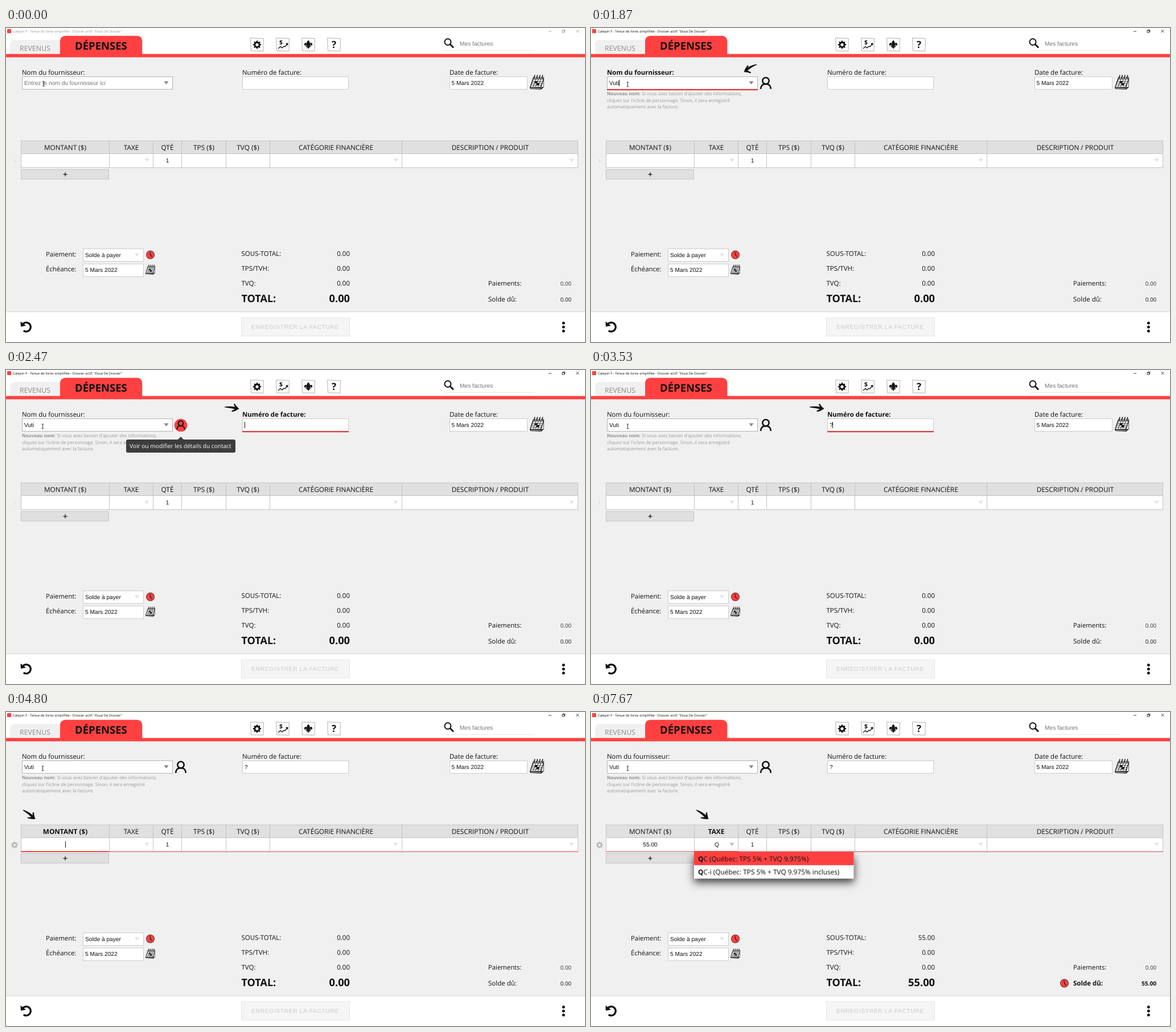
Animation of 1017x551 px, one loop 8 s. Source, as an HTML page with a canvas:

```html
<!DOCTYPE html>
<html lang="fr">
<head>
<meta charset="utf-8">
<title>Dépenses</title>
<style>
html, body { margin: 0; width: 100%; height: 100%; overflow: hidden; background: #fff; }
canvas { display: block; }
</style>
</head>
<body>
<canvas id="stage" width="1017" height="551"></canvas>
<script>
const ctx = document.getElementById('stage').getContext('2d');
const LOOP = 8000;
const RED = '#ff4040';
const UI = '"Open Sans", "Noto Sans", sans-serif';
const ARIAL = '"Liberation Sans", Arial, sans-serif';
const LIFT = 0.5; // raises every baseline
const SUPPLIER = 'Vuti';
const COLS = [26, 181, 258, 308, 386, 463, 695, 1005];
const HEADS = ['MONTANT ($)', 'TAXE', 'QTÉ', 'TPS ($)', 'TVQ ($)',
  'CATÉGORIE FINANCIÈRE', 'DESCRIPTION / PRODUIT'];

const within = (t, a, b) => t >= a && t < b;
const ramp = (t, a, b) => Math.min(1, Math.max(0, (t - a) / (b - a)));

function text(s, x, y, size, { color = '#111', bold = false, font = UI, align = 'left', gap = 0 } = {}) {
  ctx.font = `${bold ? 'bold ' : ''}${size}px ${font}`;
  ctx.textAlign = align;
  ctx.letterSpacing = gap + 'px';
  ctx.fillStyle = color;
  ctx.fillText(s, x, y - LIFT);
  return ctx.measureText(s).width;
}

const input = (s, x, y, opt = {}) => text(s, x, y, 10.2, { font: ARIAL, ...opt });

function rect(x1, y1, x2, y2, color) {
  ctx.fillStyle = color;
  ctx.fillRect(x1, y1, x2 - x1, y2 - y1);
}

function frame(x1, y1, x2, y2, fill, line) {
  rect(x1, y1, x2, y2, line);
  rect(x1 + 1, y1 + 1, x2 - 1, y2 - 1, fill);
}

function disc(x, y, r, color) {
  ctx.fillStyle = color;
  ctx.beginPath();
  ctx.arc(x, y, r, 0, Math.PI * 2);
  ctx.fill();
}

// Path from a flat list of points
function poly(p) {
  ctx.beginPath();
  for (let i = 0; i < p.length; i += 2) ctx.lineTo(p[i], p[i + 1]);
}

function line(p, color, width) {
  poly(p);
  ctx.strokeStyle = color;
  ctx.lineWidth = width;
  ctx.stroke();
}

function fillPoly(p, color) {
  poly(p);
  ctx.fillStyle = color;
  ctx.fill();
}

const drop = (x, y, color, w = 4) => fillPoly([x - w, y - 2.5, x + w, y - 2.5, x, y + 3], color);
const caret = (x, y) => rect(x, y, x + 1, y + 11, '#111');

function at(x, y, scale, draw) {
  ctx.save();
  ctx.translate(x, y);
  ctx.scale(scale, scale);
  draw();
  ctx.restore();
}

function withShadow(draw) {
  ctx.save();
  ctx.shadowColor = 'rgba(0,0,0,.75)';
  ctx.shadowBlur = 14;
  ctx.shadowOffsetY = 7;
  draw();
  ctx.restore();
}

function gear(x, y, r, color) {
  ctx.beginPath();
  for (let i = 0; i < 32; i++) {
    const a = (i - 1.5) / 32 * Math.PI * 2;
    const d = i % 4 === 1 || i % 4 === 2 ? r : r * 0.74;
    ctx.lineTo(x + Math.cos(a) * d, y + Math.sin(a) * d);
  }
  ctx.closePath();
  ctx.moveTo(x + r * 0.36, y);
  ctx.arc(x, y, r * 0.36, 0, Math.PI * 2);
  ctx.fillStyle = color;
  ctx.fill('evenodd');
}

function clock(x, y) {
  disc(x, y, 7.5, '#3a1a1a');
  disc(x, y, 6.8, RED);
  line([x - 0.5, y - 5, x, y, x + 3, y + 3.5], '#222', 1.3);
}

// Tilted desk calendar: page stack, grid, rings
function calendar(x, y, scale) {
  at(x, y, scale, () => {
    fillPoly([6, 4, 25, 4, 24.5, 22, 20, 26, 1, 25, 0, 22], '#222');
    fillPoly([6.5, 8, 23.5, 8, 18.5, 21.5, 1.5, 21.5], '#fff');
    fillPoly([20, 22.5, 24, 10, 24, 21], '#e4e4e4');
    line([2, 23.6, 19.5, 24.2], '#fff', 0.8);
    fillPoly([6.5, 5, 24, 5, 23.5, 7, 6, 7], '#bbb');
    for (let i = 1; i < 4; i++) line([6.5 + i * 4.25, 8, 1.5 + i * 4.25, 21.5], '#333', 0.9);
    for (let j = 1; j < 4; j++) line([6.5 - j * 1.25, 8 + j * 3.4, 23.5 - j * 1.25, 8 + j * 3.4], '#333', 0.9);
    fillPoly([9.5, 11.4, 13.8, 11.4, 12.5, 14.8, 8.2, 14.8], '#111');
    fillPoly([12.5, 14.8, 16.8, 14.8, 15.5, 18.2, 11.2, 18.2], '#111');
    for (let i = 0; i < 4; i++) {
      line([8 + i * 4.6, 6.5, 8.8 + i * 4.6, 0.5], '#111', 1.6);
      line([9.2 + i * 4.6, 5.5, 9.8 + i * 4.6, 2], '#fff', 0.7);
    }
  });
}

function person(x, y, scale) {
  at(x, y, scale, () => {
    ctx.strokeStyle = '#111';
    ctx.lineWidth = 2.6;
    ctx.beginPath();
    ctx.arc(0, -3.8, 5.7, 0, Math.PI * 2);
    ctx.stroke();
    ctx.beginPath();
    ctx.moveTo(-8.8, 10.5);
    ctx.bezierCurveTo(-8.8, 5, -6, 1.8, 0, 1.8);
    ctx.bezierCurveTo(6, 1.8, 8.8, 5, 8.8, 10.5);
    ctx.stroke();
  });
}

// Curved pen-drawn arrow with a swept head
function arrow(x1, y1, x2, y2, bend) {
  const len = Math.hypot(x2 - x1, y2 - y1);
  ctx.save();
  ctx.translate(x2, y2);
  ctx.rotate(Math.atan2(y2 - y1, x2 - x1));
  ctx.fillStyle = '#111';
  ctx.beginPath();
  ctx.moveTo(-len, -0.6);
  ctx.quadraticCurveTo(-len * 0.5, bend - 1.6, -3, -1.8);
  ctx.lineTo(-3, 1.8);
  ctx.quadraticCurveTo(-len * 0.5, bend + 3.2, -len, 0.6);
  ctx.fill();
  ctx.beginPath();
  ctx.moveTo(0.5, 0);
  ctx.quadraticCurveTo(-4, -2.5, -8.5, -8);
  ctx.lineTo(-10, -6.5);
  ctx.quadraticCurveTo(-6.5, -2, -6.5, 0);
  ctx.quadraticCurveTo(-8, 3, -12, 5);
  ctx.lineTo(-11.5, 7);
  ctx.quadraticCurveTo(-5, 5, 0.5, 0);
  ctx.fill();
  ctx.restore();
}

function fleur(x, y) {
  at(x, y, 1, () => {
    ctx.fillStyle = '#111';
    ctx.beginPath();
    ctx.moveTo(0, -8);
    ctx.quadraticCurveTo(5, -3, 1.2, 2);
    ctx.lineTo(-1.2, 2);
    ctx.quadraticCurveTo(-5, -3, 0, -8);
    ctx.fill();
    for (const s of [-1, 1]) {
      ctx.beginPath();
      ctx.moveTo(s * 1.4, 2);
      ctx.bezierCurveTo(s * 2, -3, s * 5, -5, s * 7, -1.5);
      ctx.bezierCurveTo(s * 7.6, 1, s * 5.5, 2.6, s * 4.6, 1.4);
      ctx.bezierCurveTo(s * 5.5, -1, s * 3.2, -0.5, s * 3, 2);
      ctx.fill();
    }
    ctx.fillRect(-4.5, 1.8, 9, 1.6);
    fillPoly([-1.3, 3, 1.3, 3, 3.8, 5.5, 1.2, 5, 0, 8, -1.2, 5, -3.8, 5.5], '#111');
  });
}

function header(t) {
  const ink = t < 70 ? '#999' : '#111';
  rect(0, 0, 1017, 46, '#fff');
  rect(2, 2, 9, 9, RED);
  text('Calepin F - Tenue de livres simplifiée - Dossier actif: "Essai De Dossier"', 12, 8.6, 5.95, { color: ink });
  line([953, 6, 958, 6], ink, 0.8);
  ctx.strokeStyle = ink;
  ctx.lineWidth = 0.8;
  ctx.strokeRect(977, 4.5, 3.5, 3.5);
  line([978.2, 4.5, 978.2, 3.3, 981.8, 3.3, 981.8, 6.8, 980.5, 6.8], ink, 0.8);
  line([1001.5, 3, 1006.5, 8], ink, 0.8);
  line([1006.5, 3, 1001.5, 8], ink, 0.8);

  ctx.fillStyle = '#f0f0f0';
  ctx.beginPath();
  ctx.roundRect(7, 21, 92, 26, [8, 0, 0, 0]);
  ctx.fill();
  text('REVENUS', 24, 40.3, 12.4, { color: '#8c8c8c' });
  ctx.fillStyle = RED;
  ctx.beginPath();
  ctx.roundRect(95, 13.7, 144.3, 34, [9, 9, 0, 0]);
  ctx.fill();
  rect(0, 45.6, 1017, 51.4, RED);
  text('DÉPENSES', 121, 38.3, 18.5, { bold: true });

  for (const x of [441, 486, 531, 576]) {
    poly([x - 11.5, 17.5, x + 11.5, 18.5, x + 11, 40.5, x - 10.5, 40, x - 11.5, 17.5]);
    ctx.fillStyle = '#fdfdfd';
    ctx.fill();
    ctx.strokeStyle = '#aaa';
    ctx.lineWidth = 0.9;
    ctx.stroke();
  }
  gear(441, 29.3, 7.3, '#111');
  text('$', 483, 29, 10.5, { bold: true, align: 'center' });
  line([478, 36, 482, 32.5, 485, 35, 488, 32, 490, 33, 494, 28], '#111', 1.3);
  fillPoly([491, 27, 495.5, 26.3, 495, 31], '#111');
  fleur(531, 29.3);
  text('?', 576, 35.5, 17, { bold: true, align: 'center' });

  ctx.strokeStyle = '#111';
  ctx.lineWidth = 2;
  ctx.beginPath();
  ctx.arc(776, 24.5, 5.5, 0, Math.PI * 2);
  ctx.stroke();
  line([780, 28.5, 786, 34.5], '#111', 2.8);
  input('Mes factures', 797, 31.2, { color: '#757575' });
  rect(769, 39, 928, 40, '#e8e8e8');
}

function field(label, x1, x2, focused, border) {
  text(label, x1, 82.3, 11.45, { bold: focused });
  frame(x1, 85, x2, 108, '#fff', border);
  if (focused) rect(x1, 107, x2, 109.3, '#e03a3a');
}

function supplier(t) {
  const focused = within(t, 270, 2070);
  field('Nom du fournisseur:', 28, 293, focused, '#b4b4b4');
  drop(281.5, 96, '#888');
  const count = [1130, 1470, 1730, 1870].filter(k => t >= k).length;
  const typed = SUPPLIER.slice(0, count);
  const width = count ? input(typed, 32, 100) : 0;
  if (!count) input('Entrez le nom du fournisseur ici', 32, 100, { color: '#757575' });
  if (focused && !within(t, 800, 1130)) caret(32 + Math.round(width), 91);
  if (focused) arrow(291, 64, 269, 77, 2.5);

  if (within(t, 270, 1130)) {
    ctx.globalAlpha = ramp(t, 200, 330);
    withShadow(() => rect(28, 109, 293, 133, '#fff'));
    ctx.globalAlpha = 1;
  }
  if (t >= 1470) {
    const grey = { color: '#999' };
    text('Nouveau nom:', 28, 118.8, 8.05, { color: '#909090', bold: true });
    text("Si vous avez besoin d'ajouter des informations,", 89.5, 118.8, 8.05, grey);
    text("cliquez sur l'icône de personnage. Sinon, il sera enregistré", 28, 130, 8.05, grey);
    text('automatiquement avec la facture.', 28, 141, 8.05, grey);
    const hot = within(t, 2070, 2670) ? 1 - ramp(t, 2470, 2670) : 0;
    if (hot) {
      ctx.globalAlpha = hot;
      disc(307, 97, 11.3, RED);
      ctx.globalAlpha = 1;
    }
    person(307, 96.5, 1 - 0.24 * hot);
  }
}

function tooltip(t) {
  const a = ramp(t, 2070, 2270) * (1 - ramp(t, 2470, 2670));
  if (!a) return;
  ctx.globalAlpha = a;
  fillPoly([301.5, 122.5, 307, 117, 312.5, 122.5], '#3d3d3d');
  ctx.fillStyle = '#3d3d3d';
  ctx.beginPath();
  ctx.roundRect(211, 122, 192, 23, 3);
  ctx.fill();
  text('Voir ou modifier les détails du contact', 217, 137.5, 10.17, { color: '#fff' });
  ctx.globalAlpha = 1;
}

function invoice(t) {
  const focused = within(t, 2470, 4000);
  field('Numéro de facture:', 415, 602, focused, '#ccc');
  if (t >= 3530) input('?', 419, 100);
  if (focused) {
    if (t >= 3530) caret(424, 91);
    else if (t < 3000) caret(419, 91);
    arrow(384, 65, 409, 68, -2.5);
  }
}

function dateField(t) {
  const focused = within(t, 4000, 4800);
  field('Date de facture:', 779, 916, focused, '#ccc');
  input('5 Mars 2022', 782.5, 100);
  calendar(920, 82, 1);
  if (focused) arrow(748, 65, 773, 68, -2.5);
}

function datePicker(t) {
  if (!within(t, 4000, 4800)) return;
  withShadow(() => rect(779, 109, 976, 356, '#fff'));
  text('Mars 2022', 877.5, 134, 11.5, { bold: true, align: 'center' });
  const x = i => 796.5 + (i % 7) * 27;
  [...'DLMMJVS'].forEach((d, i) => input(d, x(i), 164, { align: 'center', color: '#888' }));
  for (let day = 1; day <= 31; day++) {
    const slot = day + 1, y = 197 + Math.floor(slot / 7) * 34;
    if (day === 5) disc(x(slot), y - 4, 11, RED);
    input(day, x(slot), y, { align: 'center' });
  }
}

function table(t) {
  const active = t < 4800 ? -1 : t < 6800 ? 0 : 1;
  rect(26, 197.6, 1005, 245, '#c4c4c4');
  HEADS.forEach((head, i) => {
    const a = COLS[i], b = COLS[i + 1], mid = (a + b) / 2 + 0.5;
    rect(a + 1, 198.6, b, 221, '#e0e0e0');
    rect(a + 1, 221, b, 244.6, '#fff');
    text(head, mid, 214.5, 11.8, { bold: i === active, align: 'center' });
  });
  rect(26, 220, 1005, 221, '#c4c4c4');
  rect(1004, 198, 1005, 245, '#c4c4c4');
  rect(26, 244.6, 1005, 245.6, active < 0 ? '#ccc' : '#e04848');
  if (active >= 0) rect(COLS[active], 244, COLS[active + 1], 245.8, RED);
  drop(247.5, 232, t >= 6800 ? '#bbb' : '#e2e2e2');
  drop(684.5, 232, '#e2e2e2');
  drop(993.5, 232, '#e2e2e2');
  input('1', 283.5, 236, { align: 'center' });
  if (active < 0) text('1', 15, 236.5, 7.5, { color: '#bbb', align: 'center' });
  else gear(15, 233.3, 6, '#b8b8b8');

  frame(26, 248, 181, 265.6, '#e0e0e0', '#c4c4c4');
  line([100.5, 256.8, 107.5, 256.8], '#111', 1.2);
  line([104, 253.3, 104, 260.3], '#111', 1.2);

  const amount = t >= 6800 ? '55.00' : t >= 6530 ? '55' : t >= 6270 ? '5' : '';
  if (amount) input(amount, 104, 236, { align: 'center' });
  if (active === 0) {
    if (t >= 6270) caret(t >= 6530 ? 109 : 106, 227);
    else if (!within(t, 5330, 5870)) caret(104, 227);
    arrow(30, 172, 51, 187.5, -3);
  }
  if (active === 1) {
    arrow(185, 172, 206, 187.5, -3);
    if (t < 7130) caret(221, 227);
    else {
      input('Q', 221, 236, { align: 'center' });
      if (t < 7670) caret(224, 227);
    }
  }
}

function taxList(t) {
  if (t < 7130) return;
  withShadow(() => rect(181, 247, 461.5, 292.4, '#fff'));
  rect(181, 245.4, 461.5, 268.8, RED);
  const size = 11.85;
  [['C (Québec: TPS 5% + TVQ 9.975%)', 262], ['C-i (Québec: TPS 5% + TVQ 9.975% incluses)', 285]].forEach(([s, y]) => {
    const w = text('Q', 188, y, size, { bold: true });
    text(s, 188 + w, y, size);
  });
}

function totals(t) {
  const sum = t >= 6800 ? '55.00' : '0.00';
  const due = t >= 6800;
  text('Paiement:', 70, 401, 11.4);
  text('Échéance:', 70, 427.8, 11.4);
  frame(135, 387, 242, 410, '#fff', '#ccc');
  frame(135, 413.6, 242, 436.6, '#fff', '#ccc');
  input('Solde à payer', 139, 402);
  input('5 Mars 2022', 139, 428.3);
  drop(230, 398, '#e2e2e2');
  clock(253.5, 398);
  calendar(245, 415, 0.68);

  [['SOUS-TOTAL:', sum], ['TPS/TVH:', '0.00'], ['TVQ:', '0.00']].forEach(([label, value], i) => {
    text(label, 413.5, 400.3 + i * 25.9, 11.5);
    text(value, 604, 400.3 + i * 25.9, 11.5, { align: 'right' });
  });
  text('TOTAL:', 413.5, 481.5, 18, { bold: true });
  text(sum, 604, 481.5, 18.3, { bold: true, align: 'right' });
  text('Paiements:', 847, 452.3, 11.3);
  text('0.00', 993, 452.6, 9.7, { align: 'right', color: '#333' });
  text('Solde dû:', 847, 480, 11.5, { bold: due });
  text(sum, 993, 480, due ? 10.1 : 9.7, { align: 'right', bold: due });
  if (due) clock(831.5, 476);
}

function footer() {
  rect(0, 497.5, 1017, 551, '#d4d4d4');
  rect(0, 498.5, 1017, 551, '#fff');
  ctx.strokeStyle = '#111';
  ctx.lineWidth = 3.3;
  ctx.beginPath();
  ctx.arc(35.5, 524.7, 7.9, -2.45, 2.2);
  ctx.stroke();
  fillPoly([25.5, 515, 26, 524, 35, 522.5], '#111');
  frame(413, 508, 604, 541, '#f5f5f5', '#e6e6e6');
  input('ENREGISTRER LA FACTURE', 431, 528.2, { color: '#cbcbcb', gap: 0.7 });
  for (const y of [518, 525, 532]) disc(979.3, y - 0.3, 2.5, '#111');
}

function pointer(t) {
  const x = t < 70 ? 66 : 64.5, y = t < 70 ? 98 : 99;
  line([x, y - 4, x, y + 4], '#222', 0.9);
  for (const d of [-4, 4]) line([x - 2, y + d, x + 2, y + d], '#222', 0.8);
}

function draw(t) {
  ctx.textRendering = 'geometricPrecision';
  rect(0, 0, 1017, 551, '#f0f0f0');
  header(t);
  invoice(t);
  dateField(t);
  supplier(t);
  tooltip(t);
  table(t);
  datePicker(t);
  taxList(t);
  totals(t);
  footer();
  pointer(t);
}

const start = performance.now();
function tick() {
  draw((performance.now() - start) % LOOP);
  requestAnimationFrame(tick);
}
tick();
</script>
</body>
</html>
```
